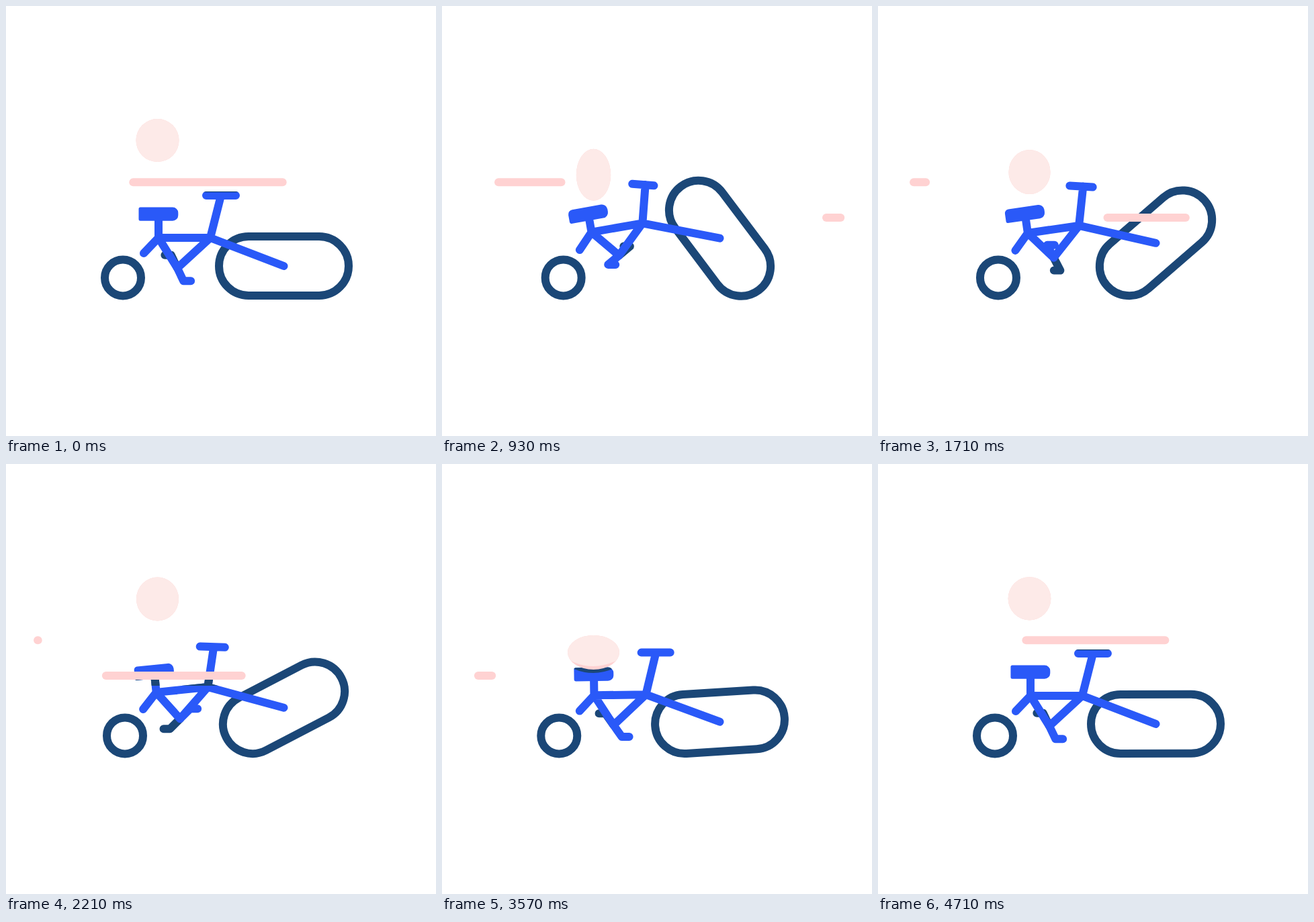
Recreate the animation shown at these times as an HTML page. Size 640 by 640 pixels, loop 4780 ms.

```html
<!DOCTYPE html>
<html lang="en">
<head>
<meta charset="utf-8">
<title>Bicycle loop</title>
<style>
html, body { margin: 0; width: 100%; height: 100%; overflow: hidden; background: #fff; }
svg { display: block; width: 100vw; height: 100vh; }
.line { fill: none; stroke-width: 12; stroke-linecap: round; stroke-linejoin: round; }
.navy { stroke: #1b4777; }
.blue { stroke: #2a59f8; }
.pink { stroke: #ffd2d2; }
#mask { mask-type: alpha; }
</style>
</head>
<body>
<svg viewBox="0 0 640 640">
  <defs>
    <mask id="mask" maskUnits="userSpaceOnUse" x="0" y="0" width="640" height="640">
      <use href="#bike"/>
    </mask>
    <clipPath id="litClip"><path id="lit"/></clipPath>
  </defs>
  <rect id="wheel" class="line navy" x="317" y="343" width="193" height="88" rx="44"/>
  <circle id="rear" class="line navy" r="27"/>
  <path id="farCrank" class="line navy"/>
  <g id="bike">
    <path id="frame" class="line blue"/>
    <path id="seat" fill="#2a59f8"/>
  </g>
  <g mask="url(#mask)">
    <path id="ballShade" fill="#1b4777"/>
    <path id="shadeA" class="line navy"/>
    <path id="shadeB" class="line navy"/>
  </g>
  <ellipse id="ballDark" cx="225.5" fill="#ffd2d2"/>
  <ellipse id="ball" cx="225.5" fill="#fdeae8" clip-path="url(#litClip)"/>
  <path id="lineA" class="line pink"/>
  <path id="lineB" class="line pink"/>
</svg>
<script>
const LOOP = 4780, BOUNCE = LOOP / 2;
const AXLE = { x: 413.5, y: 387 }, BALL_X = 225.5;
const $ = id => document.getElementById(id);
const set = (id, attrs) => {
  for (const key in attrs) $(id).setAttribute(key, attrs[key]);
};
const clamp = (v, a, b) => Math.min(b, Math.max(a, v));
const rad = deg => deg * Math.PI / 180;

// Monotone cubic curve through a few [time, value] points
function curve(pts) {
  const n = pts.length;
  const sec = pts.slice(1).map((p, i) => (p[1] - pts[i][1]) / (p[0] - pts[i][0]));
  const tan = pts.map((p, i) => {
    if (i === 0) return sec[0];
    if (i === n - 1) return sec[n - 2];
    const a = sec[i - 1], b = sec[i];
    return a * b <= 0 ? 0 : 2 * a * b / (a + b);
  });
  return t => {
    let i = 0;
    while (i < n - 2 && t > pts[i + 1][0]) i++;
    const [x0, y0] = pts[i], [x1, y1] = pts[i + 1];
    const h = x1 - x0, s = clamp((t - x0) / h, 0, 1), r = 1 - s;
    return y0 * (1 + 2 * s) * r * r + y1 * s * s * (3 - 2 * s)
      + h * s * r * (tan[i] * r - tan[i + 1] * s);
  };
}

const lead = curve([[0, 0], [.105, .124], [.16, .234], [.27, .448], [.314, .691],
  [.333, .745], [.416, .817], [.473, .854], [.584, .929], [.693, .961],
  [.747, .98], [.796, .986], [.95, .998], [1, 1]]);
const trail = curve([[0, 0], [.117, .06], [.16, .103], [.314, .323], [.333, .35],
  [.416, .458], [.473, .616], [.578, .746], [.693, .902], [.796, .95], [.95, .997], [1, 1]]);
const crankTurn = curve([[0, 64.6], [500, 97.8], [1290, 182.6], [2210, 315],
  [2790, 376.7], [3570, 414.8], [4400, 424], [4780, 424.6]]);
const ballTop = curve([[0, 168], [180, 168.5], [400, 171], [500, 174.2], [570, 178],
  [1040, 227], [1185, 255], [1290, 250], [1610, 226.5], [1710, 214], [1950, 183],
  [2210, 168.5], [2390, 168]]);
const ballBottom = curve([[0, 232], [180, 233.5], [400, 239.5], [500, 244], [570, 249.5],
  [1040, 299], [1185, 306], [1290, 305], [1610, 292], [1710, 280], [1950, 251],
  [2210, 233.5], [2390, 232]]);

// Everything above a shallow bowl whose lowest point is at y
const bowl = y => `M${BALL_X - 60} 100V${y - 25.6}Q${BALL_X} ${y + 25.6} ${BALL_X + 60} ${y - 25.6}V100Z`;

function drawStreak(name, y, start, t) {
  const u = ((t - start + LOOP) % LOOP) / (LOOP * .75);
  const on = u > 0 && u < 1;
  const x0 = 609 - 563 * lead(u), x1 = Math.max(x0 + .01, 609 - 563 * trail(u));
  set('line' + name, { d: on ? `M${x0} ${y}H${x1}` : '' });
  set('shade' + name, { d: on ? `M${x0} ${y + 9}H${x1}` : '' });
}

function drawBall(t) {
  const p = t % BOUNCE, top = ballTop(p), bottom = ballBottom(p);
  const ry = (bottom - top) / 2;
  const shape = { cy: (top + bottom) / 2, rx: 64 - ry, ry };
  const squash = Math.max(0, 32 - ry), edge = Math.min(5, squash);
  set('ball', shape);
  set('ballDark', shape);
  set('lit', { d: bowl(bottom - edge + (edge ? 0 : 1)) });
  set('ballShade', { d: edge ? bowl(bottom + edge) : '' });
  return 3.5 * clamp(squash / 6.5, 0, 1) ** 2;
}

function drawBike(t, press) {
  const turn = 180 * lead(t / LOOP), s = Math.sin(rad(turn));
  const rise = 52.5 * s - 2.6 * s ** 6;
  const k = rise / 49.5, bend = Math.max(0, k) ** 1.2;
  const phi = Math.asin((17.5 + rise) / 240.6) - Math.asin(17.5 / 240.6);
  const deg = phi * 180 / Math.PI, c = Math.cos(phi), n = Math.sin(phi);

  // Frame coordinates tilted about the front axle
  const at = (x, y) => {
    const dx = x - AXLE.x, dy = y - AXLE.y;
    return [AXLE.x + dx * c + dy * n, AXLE.y - rise - dx * n + dy * c];
  };
  const path = (...pts) => 'M' + pts.map(p => p[0].toFixed(2) + ' ' + p[1].toFixed(2)).join('L');

  set('wheel', { transform: `translate(0 ${-rise}) rotate(${turn} ${AXLE.x} ${AXLE.y})` });
  const hub = at(174, 404.5);
  set('rear', { cx: hub[0], cy: hub[1] });

  const [bx, by] = at(255, 390);
  const pivot = [bx + 7 * bend, by - 6 * bend];
  const a = rad(crankTurn(t)), cx = 21.3 * Math.cos(a), cy = 21.3 * Math.sin(a);
  const crank = (sign, pedal) => {
    const tip = [pivot[0] + sign * cx, pivot[1] + sign * cy];
    return path(pivot, tip, [tip[0] + pedal, tip[1]]);
  };
  set('farCrank', { d: crank(-1, -9.5) });

  const rearTop = at(227, 345), head = at(304, 345);
  const drop = 9 * k + press, shrink = 1 - .14 * k;
  const stem = at(304 + 16 * shrink, 345 - 63 * shrink);
  const tilt = rad(18 * bend) - phi, half = 22 - 7 * k;
  const hx = half * Math.cos(tilt), hy = half * Math.sin(tilt), mid = stem[0] - 4 * k;
  set('frame', {
    d: path(at(205, 368), rearTop, pivot, head, rearTop, at(227, 310 + drop))
      + path(stem, head, at(AXLE.x, AXLE.y))
      + path([mid - hx, stem[1] - hy], [mid + hx, stem[1] + hy])
      + crank(1, 11)
  });

  const r = 2.5 + 5.5 * bend;
  set('seat', {
    d: `M${197.5 + r} 299.5H248a8.3 8.3 0 0 1 8.3 8.3V311.5a8.3 8.3 0 0 1 -8.3 8.3`
      + `H200a2.5 2.5 0 0 1 -2.5 -2.5V${299.5 + r}a${r} ${r} 0 0 1 ${r} ${-r}Z`,
    transform: `translate(0 ${-rise}) rotate(${-deg} ${AXLE.x} ${AXLE.y}) translate(0 ${drop})`
  });
}

function render(t) {
  drawBike(t, drawBall(t));
  drawStreak('A', 262.3, LOOP * .75, t);
  drawStreak('B', 315, LOOP * .15, t);
}

let began;
function tick(now) {
  if (began === undefined) began = now;
  render((now - began) % LOOP);
  requestAnimationFrame(tick);
}
render(0);
requestAnimationFrame(tick);
</script>
</body>
</html>
```
